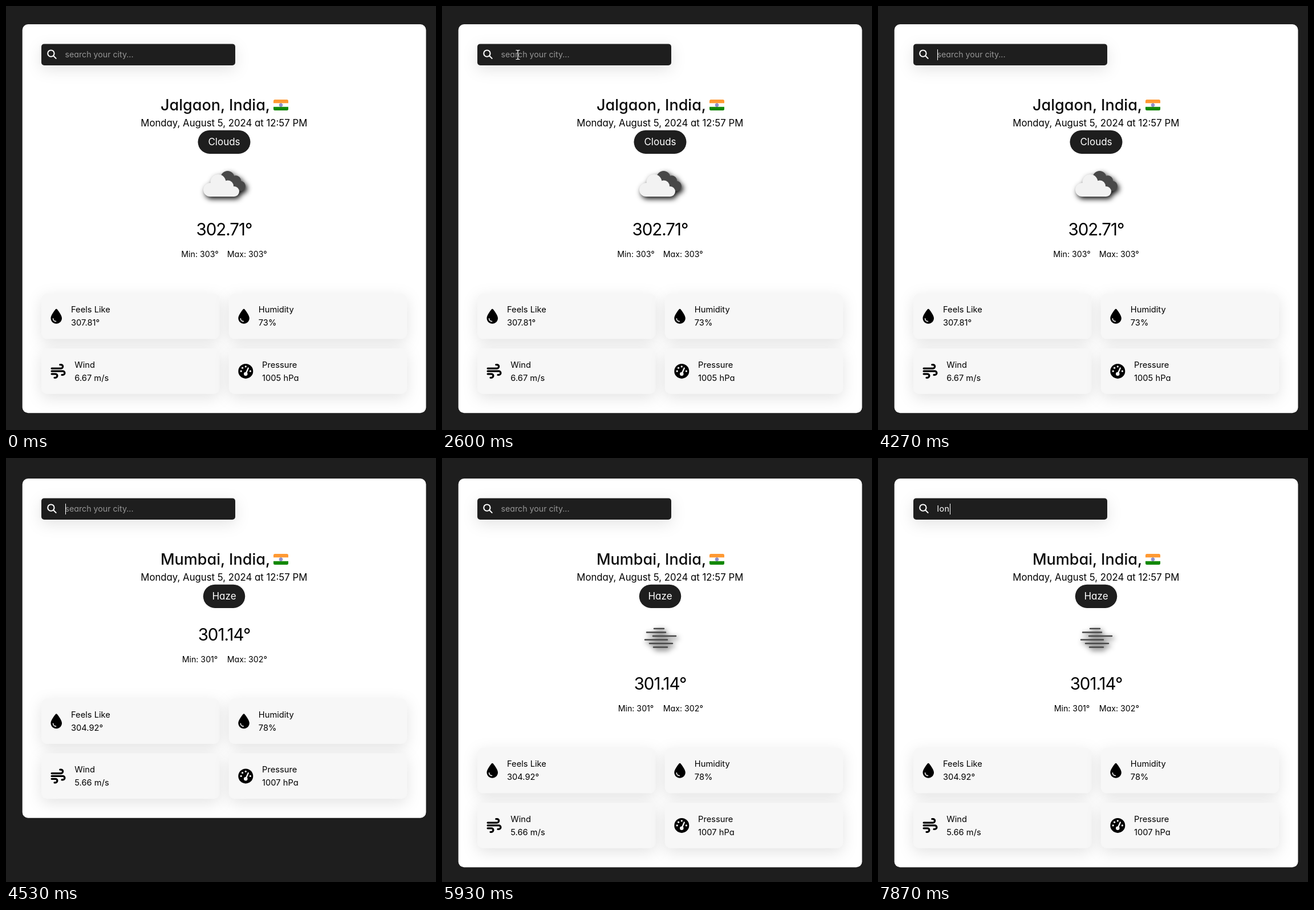
Recreate the animation shown at these times as an HTML page. Size 754 px wide and 743 px high, loop 8 s.

```html
<!DOCTYPE html>
<html lang="en">
<head>
<meta charset="utf-8">
<title>Weather</title>
<style>
  html, body { margin: 0; width: 100%; height: 100%; overflow: hidden; background: #1e1e1e; }
  svg { display: block; }
  text { font-family: Inter, "Open Sans", sans-serif; font-feature-settings: "cv11"; fill: #000; white-space: pre; }
  .mid { text-anchor: middle; }
  .search, .tile rect { filter: drop-shadow(0 7px 13px rgba(0, 0, 0, .11)); }
  .search, .pill { fill: #1e1e1e; }
  .hint { font-size: 14.2px; fill: #969696; }
  .typed { font-size: 14.3px; letter-spacing: .5px; fill: #fff; }
  .place { font-size: 27px; font-weight: 500; fill: #0c0c0c; }
  .date { font-size: 16.75px; }
  .sky { font-size: 17px; fill: #fff; }
  .temp { font-size: 29.5px; letter-spacing: -1px; }
  .range { font-size: 14.2px; }
  .tile rect { fill: #f7f7f7; }
  .tile text { font-size: 14.7px; }
  .icon { filter: drop-shadow(3px 4px 5px rgba(0, 0, 0, .95)); }
  .line { fill: none; stroke-width: 64; stroke-linecap: round; }
</style>
</head>
<body>
<svg id="stage" width="754" height="743" viewBox="0 0 754 743">
  <defs>
    <path id="drop" d="M192 512C86 512 0 426 0 320C0 229 130 58 167 12C180-4 204-4 217 12C254 58 384 229 384 320C384 426 298 512 192 512zM96 336a16 16 0 0 0-32 0a112 112 0 0 0 112 112a16 16 0 0 0 0-32a80 80 0 0 1-80-80z"/>
    <path id="wind" class="line" stroke="#000" d="M32 160H352a64 64 0 0 0 0-128H320M32 256H416a64 64 0 0 1 0 128H384M32 352H160a64 64 0 0 1 0 128H128"/>
    <g id="gauge">
      <circle cx="256" cy="256" r="256"/>
      <g fill="#f7f7f7">
        <circle cx="256" cy="96" r="32"/>
        <circle cx="144" cy="144" r="32"/>
        <circle cx="96" cy="256" r="32"/>
        <circle cx="416" cy="256" r="32"/>
        <circle cx="256" cy="352" r="64"/>
      </g>
      <path d="M256 352L344 152" stroke="#f7f7f7" stroke-width="48" stroke-linecap="round"/>
    </g>
    <clipPath id="flagShape"><rect x="469" y="164" width="26" height="19" rx="2.5"/></clipPath>
  </defs>

  <g id="page">
    <rect id="card" x="28.7" y="32" width="707.8" rx="10" fill="#fff"/>

    <rect class="search" x="62" y="66.4" width="340" height="37.5" rx="5"/>
    <path class="line" stroke="#fff" transform="translate(72.2 76.4) scale(.0322)" d="M32 208a176 176 0 1 0 352 0a176 176 0 1 0-352 0M336 336L480 480"/>
    <text class="hint" id="hint" x="103.5" y="90">search your city...</text>
    <text class="typed" id="typed" x="103.5" y="90"></text>
    <rect id="caret" y="76" width="1" height="19" fill="#fff"/>

    <text class="place mid" id="place" x="367" y="182.5"></text>
    <g clip-path="url(#flagShape)">
      <path fill="#f93" d="M469 164h26v6.4h-26z"/>
      <path fill="#fff" d="M469 170.4h26v6.4h-26z"/>
      <path fill="#128807" d="M469 176.8h26v6.4h-26z"/>
      <circle cx="482" cy="173.6" r="2.6" fill="#dde" stroke="#008" stroke-width=".7"/>
      <circle cx="482" cy="173.6" r=".9" fill="#008"/>
    </g>
    <text class="date mid" x="382.3" y="211">Monday, August 5, 2024 at 12:57 PM</text>
    <rect class="pill" id="pill" y="217.7" height="41.2" rx="20.6"/>
    <text class="sky mid" id="sky" x="382.5" y="244.2"></text>

    <g class="icon" id="clouds">
      <g fill="#484848">
        <circle cx="388.5" cy="301" r="12"/>
        <circle cx="403" cy="306" r="9"/>
        <circle cx="411" cy="315.5" r="9"/>
        <path d="M385 302h18l8 22.5h-26z"/>
      </g>
      <g fill="#f2f2f2">
        <circle cx="358" cy="322" r="12"/>
        <circle cx="372" cy="308.5" r="13.5"/>
        <circle cx="389" cy="315.5" r="10"/>
        <circle cx="400" cy="325" r="9"/>
        <path d="M358 312h34l8 8v14h-42z"/>
      </g>
    </g>
    <path class="icon" id="haze" fill="none" stroke="#484848" stroke-width="2.6" stroke-linecap="round" d="M372 295h17M359 301.5h33M370 308h40M356 314.5h39M364 321h40M371 327.5h24"/>

    <g id="lower">
      <text class="temp mid" id="temp" x="382.5" y="402"></text>
      <text class="range mid" id="min" x="340" y="440"></text>
      <text class="range mid" id="max" x="422.8" y="440"></text>
      <g id="tiles"></g>
    </g>
  </g>

  <path id="arrow" d="M0 0V16L3.7 12.5L6.2 18.3L8.6 17.3L6.2 11.6H11.3z" fill="#fff" stroke="#000"/>
  <path id="beam" d="M129.5 77.5h2.5l1 1l1-1h2.5M133 78.5v14M129.5 93.5h2.5l1-1l1 1h2.5" fill="none" stroke="#fff" stroke-width="1.2"/>
</svg>
<script>
  const $ = id => document.getElementById(id);
  const show = (id, on) => { $(id).style.display = on ? "" : "none"; };
  const write = (id, s) => { if ($(id).textContent !== s) $(id).textContent = s; };

  const LOOP = 8000, CHANGE = 4530, ICON_READY = 4600;
  const SHIFT = 4, CARD_HEIGHT = 681.2, ICON_ROOM = 86.5;

  const cities = [
    { place: "Jalgaon, India,", sky: "Clouds", pill: 92, temp: "302.71°", min: "Min: 303°", max: "Max: 303°",
      values: ["307.81°", "73%", "6.67 m/s", "1005 hPa"] },
    { place: "Mumbai, India,", sky: "Haze", pill: 73.5, temp: "301.14°", min: "Min: 301°", max: "Max: 302°",
      values: ["304.92°", "78%", "5.66 m/s", "1007 hPa"] }
  ];

  // label, icon, text offset inside the tile
  const tiles = [["Feels Like", "drop", 52], ["Humidity", "drop", 52], ["Wind", "wind", 58.3], ["Pressure", "gauge", 58.3]];
  $("tiles").innerHTML = tiles.map(([label, icon, dx], i) => `
    <g class="tile" transform="translate(${62 + i % 2 * 328.8} ${503.7 + (i >> 1) * 96.2})">
      <rect width="312.4" height="79.8" rx="10"/>
      <use href="#${icon}" transform="translate(16.5 27) scale(.0508)"/>
      <text x="${dx}" y="33.8">${label}</text>
      <text id="value${i}" x="${dx}" y="56.8"></text>
    </g>`).join("");

  // time, text typed so far
  const typing = [[0, ""], [2800, "m"], [3130, "mu"], [3400, "mum"], [3600, "mumb"], [3730, "mumba"], [3870, "mumbai"],
    [4270, ""], [7470, "l"], [7670, "lo"], [7870, "lon"]];
  // the caret flips at each of these times
  const blinks = [1000, 1470, 2070, 2600, 2800, 4800, 5330, 5930, 6400, 6930, 7670];

  const curve = (a, b, c, s) => a * (1 - s) ** 2 + 2 * b * s * (1 - s) + c * s * s;

  function pointer(t) {
    const step = Math.floor((t - 70) / 73);
    const moving = step >= 0 && step < 10;
    show("arrow", moving);
    show("beam", step >= 10 && t < 2800);
    if (moving) {
      const s = step / 10;
      $("arrow").setAttribute("transform", `translate(${curve(744, -268, 133, s)} ${curve(726, 420, 85, s)})`);
    }
  }

  function searchBox(t) {
    const text = typing.filter(([at]) => at <= t).pop()[1];
    write("typed", text);
    show("hint", !text);
    show("caret", blinks.filter(at => at <= t).length % 2);
    $("caret").setAttribute("x", Math.round(104 + (text ? $("typed").getComputedTextLength() : 0)));
  }

  function weather(t) {
    const next = t >= CHANGE;
    const city = cities[+next];
    const missing = next && t < ICON_READY ? ICON_ROOM : 0;
    for (const key of ["place", "sky", "temp", "min", "max"]) write(key, city[key]);
    city.values.forEach((v, i) => write("value" + i, v));
    $("pill").setAttribute("x", 382.5 - city.pill / 2);
    $("pill").setAttribute("width", city.pill);
    show("clouds", !next);
    show("haze", next && !missing);
    $("page").setAttribute("transform", `translate(0 ${next ? SHIFT : 0})`);
    $("lower").setAttribute("transform", `translate(0 ${-missing})`);
    $("card").setAttribute("height", CARD_HEIGHT - missing);
  }

  const start = performance.now();
  function draw() {
    const t = (performance.now() - start) % LOOP;
    weather(t);
    searchBox(t);
    pointer(t);
    requestAnimationFrame(draw);
  }
  draw();
</script>
</body>
</html>
```
